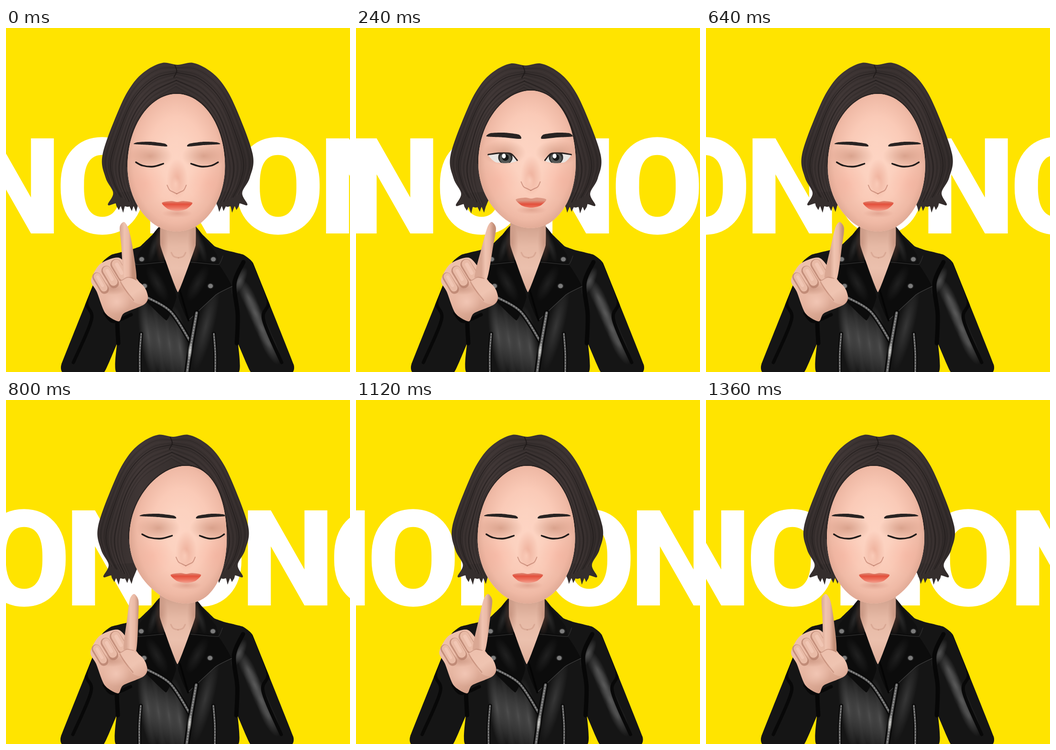
These frames come from a looping animation (720x720 px, 1440 ms). An HTML page with a canvas:

```html
<!DOCTYPE html>
<html lang="en">
<head>
<meta charset="utf-8">
<title>No no</title>
<style>
html, body { margin: 0; width: 100%; height: 100%; overflow: hidden; background: #ffe400; }
canvas { display: block; }
</style>
</head>
<body>
<canvas id="stage" width="720" height="720"></canvas>
<script>
const ctx = document.getElementById('stage').getContext('2d');
const LOOP = 1440, STEP = 80, STEPS = LOOP / STEP, WORD = 368;
const FACE = { x: 356, y: 289, rx: 102, up: 151, down: 137 };

const still = (x, y) => [x, y];
let place = still;
const lerp = (a, b, k) => a + (b - a) * k;
const wave = (step, cycles, peak) => Math.cos(2 * Math.PI * cycles * (step - peak) / STEPS);

// Smooth curve through flat x,y pairs; round = 0 gives straight edges.
function trace(flat, closed, round) {
  const p = [];
  for (let i = 0; i < flat.length; i += 2) p.push(place(flat[i], flat[i + 1]));
  const n = p.length, k = round / 6;
  const at = i => closed ? p[(i + n) % n] : p[Math.max(0, Math.min(n - 1, i))];
  ctx.beginPath();
  ctx.moveTo(...p[0]);
  for (let i = 0; i < (closed ? n : n - 1); i++) {
    const [a, b, c, d] = [at(i - 1), at(i), at(i + 1), at(i + 2)];
    ctx.bezierCurveTo(b[0] + (c[0] - a[0]) * k, b[1] + (c[1] - a[1]) * k,
      c[0] - (d[0] - b[0]) * k, c[1] - (d[1] - b[1]) * k, c[0], c[1]);
  }
  if (closed) ctx.closePath();
}

function shape(flat, fill, round = 1) {
  trace(flat, true, round);
  ctx.fillStyle = fill;
  ctx.fill();
}

function line(flat, color, width, round = 1) {
  trace(flat, false, round);
  ctx.strokeStyle = color;
  ctx.lineWidth = width;
  ctx.lineCap = ctx.lineJoin = 'round';
  ctx.stroke();
}

// Turns offsets from an axis into points on one side of it.
const onSide = (half, axis, side) => half.map((v, i) => i % 2 ? v : axis + side * v);

// Joins a half outline with its mirror image.
function mirrored(half, axis) {
  const back = [];
  for (let i = 0; i < half.length; i += 2) if (half[i]) back.unshift(axis - half[i], half[i + 1]);
  return [...onSide(half, axis, 1), ...back];
}

function ramp(gradient, colors) {
  colors.forEach((c, i) => gradient.addColorStop(i / (colors.length - 1), c));
  return gradient;
}
const linear = (x0, y0, x1, y1, ...colors) => ramp(ctx.createLinearGradient(x0, y0, x1, y1), colors);

function blob(x, y, rx, ry, turn, ...colors) {
  ctx.save();
  ctx.translate(...place(x, y));
  ctx.rotate(turn);
  ctx.scale(rx, ry);
  ctx.fillStyle = ramp(ctx.createRadialGradient(0, 0, 0, 0, 0, 1), colors);
  ctx.fillRect(-1, -1, 2, 2);
  ctx.restore();
}
const glow = (x, y, rx, ry, rgb, alpha, turn = 0) =>
  blob(x, y, rx, ry, turn, `rgba(${rgb},${alpha})`, `rgba(${rgb},${alpha / 2})`, `rgba(${rgb},0)`);

function disc(x, y, rx, ry, fill) {
  ctx.beginPath();
  ctx.ellipse(...place(x, y), rx, ry, 0, 0, 7);
  ctx.fillStyle = fill;
  ctx.fill();
}

function drawWords(step) {
  ctx.fillStyle = '#fff';
  ctx.font = '900 280px Roboto, Inter, sans-serif';
  ctx.textAlign = 'center';
  for (let x = -64 + (step / STEPS - 1) * WORD; x < 720; x += WORD) {
    ctx.fillText('N', x + 81, 430);
    ctx.fillText('O', x + 265.5, 430);
  }
}

function drawZip(path, width) {
  line(path, '#080808', width * 2);
  line(path, '#505050', width);
  ctx.setLineDash([2, 4]);
  line(path, '#8c8c8c', width / 2);
  ctx.setLineDash([]);
}

function drawJacket() {
  const axis = 359;
  const outline = [36,414, 52,432, 78,457, 100,465, 137,474, 158,492, 243,704, 240,721,
    154,721, 127,662, 127,721];
  ctx.save();
  trace(mirrored(outline, axis), true, 0.2);
  ctx.fillStyle = '#151515';
  ctx.fill();
  ctx.clip();

  // Leather sheen
  for (let i = 0; i < 4; i++) {
    glow(298 + 22 * i, 645 + 8 * i, 18, 90, '125,125,125', 0.55, -0.15);
    glow(508 + 14 * i, 565 + 32 * i, 15, 48, '130,130,130', 0.5, -0.45);
  }
  glow(418, 625, 18, 95, '95,95,95', 0.45, 0.25);
  glow(488, 530, 12, 32, '120,120,120', 0.6, 0.45);

  for (const side of [-1, 1]) {
    const half = (...pts) => onSide(pts, axis, side);
    // Armhole, sleeve fold, collar, lapel
    line(half(138,490, 119,535, 126,600, 124,660), '#070707', 9);
    line(half(160,490, 190,570, 180,610, 218,700), '#080808', 7);
    shape(half(35,414, 80,470, 86,494, 28,490, 38,454), '#101010', 0.3);
    shape(half(28,488, 86,495, 114,541, 80,558, 23,612, 2,562), '#0c0c0c', 0.3);
    glow(axis + side * 49, 458, 9, 34, '58,58,58', 0.6, -side * 0.3);
    glow(axis + side * 42, 535, 15, 42, '46,46,46', 0.6, side * 0.5);
    line(half(28,490, 86,495, 95,477), '#2b2b2b', 1.5, 0.3);
    drawZip(half(76,640, 79,680, 79,721), 4);
    for (const [x, y] of [[75, 484], [69, 540]]) {
      disc(axis + side * x, y, 7, 6, '#252525');
      disc(axis + side * x, y, 5, 4.5, '#7c7c7c');
    }
  }
  line([382,612, 440,558, 473,541], '#3b3b3b', 1.5, 0.4);
  line([333,487, 365,553, 382,612], '#050505', 4, 0.3);
  drawZip([298,565, 345,594, 385,655], 5);
  drawZip([399,596, 387,665, 379,721], 6);
  glow(385, 676, 5, 20, '235,235,230', 0.8, 0.1);
  ctx.restore();
}

function drawNeck() {
  shape(mirrored([35,400, 37,454, 26,487, 0,553], 360),
    linear(0, 410, 0, 550, '#cf9f8b', '#e6b9a5', '#ebc0ad', '#deae9a'), 0.3);
  for (const side of [-1, 1]) {
    glow(360 + side * 34, 450, 14, 44, '165,108,88', 0.4);
    line(onSide([15,470, 10,478, 0,481], 361, side), 'rgba(185,125,105,.3)', 3);
  }
}

const faceHalf = y => {
  const u = (y - FACE.y) / (y < FACE.y ? FACE.up : FACE.down);
  return FACE.rx * Math.sqrt(Math.max(0, 1 - u * u));
};

function faceArc(from, to) {
  const pts = [];
  for (let i = 0; i < 24; i++) {
    const a = lerp(from, to, i / 24), s = Math.sin(a);
    pts.push(FACE.x + FACE.rx * Math.cos(a), FACE.y + (s < 0 ? FACE.up : FACE.down) * s);
  }
  return pts;
}

function drawHair() {
  const axis = 360;
  const half = [0,77, 32,73, 66,89, 95,118, 122,168, 157,264, 151,313, 135,345,
    146,370, 126,366, 60,350];
  shape(mirrored(half, axis), linear(200, 0, 520, 0, '#332c2b', '#3f3635', '#362f2e', '#3c3332', '#2f2928'));

  const tips = [135,345];
  for (let i = 0; i < 5; i++) {
    const x = 124 - 9 * i;
    tips.push(x + 4, 373, x - 1, 381 + 7 * Math.sin(i * 2.2), x - 4, 374);
  }
  tips.push(70, 340);

  const outer = half.slice(0, 16);
  for (const side of [-1, 1]) {
    shape(onSide(tips, axis, side), '#352e2d', 0);
    for (let i = 1; i < 15; i++) {
      const strand = outer.map((v, n) => {
        const y = lerp(126, 372, (n >> 1) / 7);
        return lerp(v, n % 2 ? y : faceHalf(y), i / 15);
      });
      const main = i % 5 == 0;
      line(onSide(strand, axis - 4 * i / 15, side),
        main ? 'rgba(25,20,20,.5)' : i % 2 ? 'rgba(82,70,68,.25)' : 'rgba(30,24,24,.25)', main ? 2 : 1.5);
    }
  }
  line([354,78, 358,90, 352,103], '#211c1b', 2);
}

function drawEye(side, open) {
  const axis = 357, half = (...pts) => onSide(pts, axis, side);
  const lift = -9 * open, bulk = 3 * open;
  shape(half(90,243 + lift, 82,239 + lift - bulk, 56,238 + lift - bulk, 26,242 + lift - bulk,
    22,248 + lift, 56,245 + lift), '#282322', 0.7);
  if (open < 0.05) return line(half(86,281, 72,288, 50,290, 29,284), '#1d1918', 3.3);

  const lid = half(87, lerp(281, 272, open), 67, lerp(289, 269, open),
    42, lerp(290, 270, open), 29, 284);
  const iris = axis + side * 53;
  ctx.save();
  shape([...lid, ...half(42,289, 72,288)], '#e9e6e3', 0.7);
  ctx.clip();
  disc(iris, 278, 15, 14, '#292b2b');
  disc(iris, 280, 12, 11, '#555856');
  disc(iris, 278, 7, 7, '#171818');
  disc(iris - 3, 275, 4, 5, '#fff');
  ctx.restore();
  line(lid, '#282120', 2.8, 0.7);
}

function drawFeatures(open) {
  const axis = 357;
  for (const side of [-1, 1]) {
    glow(axis + side * 56, 268, 46, 27, '185,122,98', 0.5);
    glow(axis + side * 66, 325, 42, 42, '245,150,130', 0.2);
    drawEye(side, open);
  }
  glow(axis, 316, 22, 42, '225,145,122', 0.5);
  glow(axis - 3, 326, 9, 16, '255,214,196', 0.6);
  line(mirrored([20,329, 15,339, 8,343, 0,347], axis - 1).slice(0, 8), 'rgba(170,100,82,.5)', 2);
  line(onSide([20,329, 15,339, 8,343, 0,347], axis - 1, -1), 'rgba(170,100,82,.5)', 2);
  glow(axis, 388, 32, 9, '200,125,105', 0.4);
  shape(mirrored([0,364, 13,362, 32,366, 19,379, 0,383], axis),
    linear(0, 361, 0, 384, '#dc9783', '#e3503c', '#ee7561', '#f2a998'), 0.8);
}

function drawHead(yaw, pitch, open) {
  // Points near the middle of the face turn further than its edges.
  const turned = edge => (x, y) => {
    const front = Math.max(0, 1 - ((x - FACE.x) / FACE.rx) ** 2);
    return [x + yaw * lerp(edge, 1, front), y + pitch];
  };
  place = (x, y) => [x - yaw / 2, y - pitch * 0.2];
  drawHair();

  place = turned(0.2);
  line(faceArc(-Math.PI, 0), 'rgba(28,22,21,.5)', 5);
  shape(faceArc(0, 2 * Math.PI), '#fbd0be');
  ctx.save();
  ctx.clip();
  blob(FACE.x - yaw / 2, 275, 122, 178, 0, '#fdd4c3', '#fcd2c0', '#facab7', '#efb9a5', '#cf9782');
  place = turned(0.55);
  drawFeatures(open);
  ctx.restore();
  place = still;
}

function drawHand(tip) {
  line([207,597, 225,614, 262,600], '#080808', 7);
  shape([178,528, 197,494, 237,481, 266,515, 296,557, 290,578, 247,597, 236,614, 208,597, 190,552],
    linear(195, 490, 260, 615, '#edc0ad', '#ecbda9', '#e3b19d', '#cb9782'), 0.8);
  glow(232, 573, 28, 26, '250,210,194', 0.6);
  glow(222, 545, 32, 14, '170,112,92', 0.4);

  // Curled fingers
  for (let i = 0; i < 3; i++) {
    const x = 190 + 20 * i, y = 521 - 13 * i, width = 19 + 2 * i;
    line([x, y, x + 16, y + 26], 'rgba(180,125,105,.7)', width);
    line([x + 1, y - 1, x + 15, y + 23], '#e9bba7', width - 4);
    line([x + 2, y, x + 12, y + 18], 'rgba(248,208,192,.55)', width / 3);
  }

  // Raised finger, bending from its base
  const mid = lerp(261, tip, 0.62);
  shape([248,525, mid - 11,455, tip - 9,417, tip,406, tip + 9,419, mid + 12,455, 273,528],
    linear(mid - 13, 460, mid + 13, 460, '#d9a793', '#f0c4b1', '#eab9a5', '#c49079'), 0.8);

  // Thumb
  shape([240,530, 256,522, 284,536, 296,558, 288,578, 266,572, 252,549],
    linear(250, 525, 285, 585, '#edc0ad', '#efc4b1', '#dba894'));
  line([240,532, 250,548, 267,570], 'rgba(170,112,92,.45)', 2.5);
  line([241,529, 254,522, 268,524], 'rgba(170,112,92,.4)', 2);
}

function draw(step) {
  const open = Math.max(0, 1 - Math.abs(step - 3) / 1.6);
  const yaw = 5.8 + 11.4 * wave(step, 2, 2.1) - 6.3 * wave(step, 1, 1.3);
  const lean = -3 * Math.max(0, wave(step, 1, 12.8)) ** 2;
  const tip = 265.5 + 19.5 * wave(step, 3, 2.7);
  ctx.fillStyle = '#ffe400';
  ctx.fillRect(0, 0, 720, 720);
  drawWords(step);
  ctx.save();
  ctx.translate(lean, 0);
  drawJacket();
  drawNeck();
  ctx.restore();
  drawHead(yaw, -7 * open, open);
  ctx.save();
  ctx.translate(lean * 1.5, 0);
  drawHand(tip);
  ctx.restore();
}

const began = performance.now();
function tick() {
  const time = (performance.now() - began) % LOOP;
  draw(Math.floor(time / STEP));
  requestAnimationFrame(tick);
}
tick();
</script>
</body>
</html>
```
